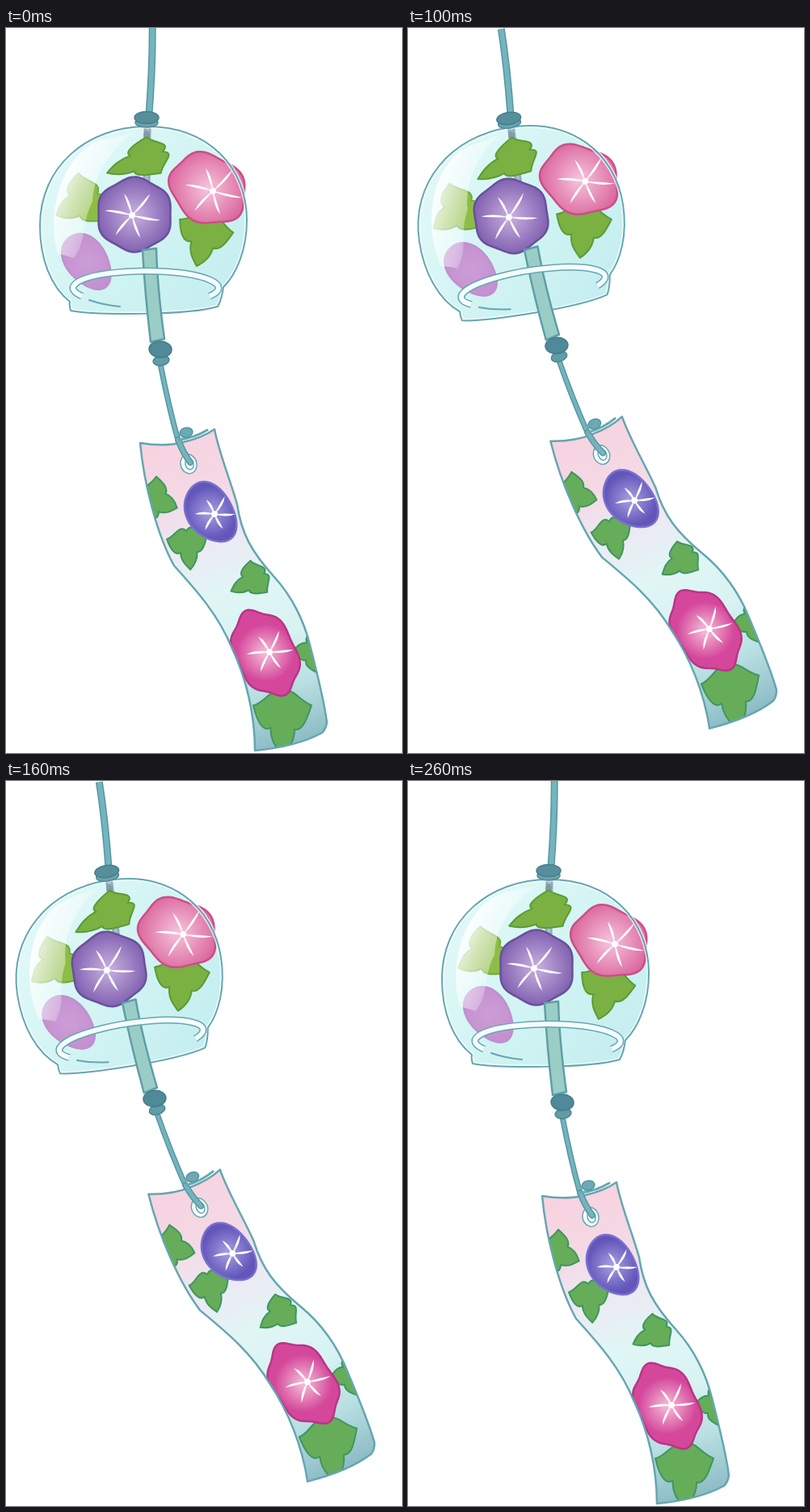
Animation, 490 px wide and 898 px high, one loop 300 ms. Source, as an HTML page with a canvas:

```html
<!DOCTYPE html>
<html lang="en">
<head>
<meta charset="utf-8">
<title>Wind chime</title>
<style>
html, body { margin: 0; width: 100%; height: 100%; overflow: hidden; background: #fff; }
canvas { display: block; width: 490px; height: 898px; }
</style>
</head>
<body>
<canvas id="stage" width="490" height="898"></canvas>
<script>
const ctx = document.getElementById('stage').getContext('2d');
const LOOP = 300, STEP = 100, TAU = Math.PI * 2;
const TEAL = '#65a6b1';

const BELL = new Path2D('M174 122 C250 122 298 172 298 238 C298 275 285 305 269 321 Q267 336 262 345 ' +
  'C225 356 110 356 80 350 Q78 343 79 339 C55 320 42 285 42 245 C42 172 100 122 174 122 Z');
const SHEEN = new Path2D('M158 130 C125 155 108 185 107 215 C92 245 101 262 84 285 L64 279 C48 220 75 150 120 138 Z');
const TUBE = new Path2D('M169 275 L186 273 Q187 320 196 385 L179 389 Q172 330 169 275 Z');
const STRIP = new Path2D('M166 514 C184 517 204 517 219 513 Q242 508 258 497 C264 528 277 558 286 590 ' +
  'C291 625 303 648 332 680 C354 704 369 735 376 764 Q394 834 397 860 Q396 868 391 873 ' +
  'Q360 890 308 895 C308 850 297 805 280 769 C263 727 236 697 208 666 C188 630 171 568 166 514 Z');

// Three-lobed leaf in unit size, tip pointing down
const LEAF = new Path2D('M0 -.6 C.3 -.95 .5 -.5 1 -.35 C.85 0 .7 .35 .42 .3 C.42 .6 .2 .85 0 1 ' +
  'C-.2 .8 -.42 .6 -.4 .25 C-.7 .4 -.9 0 -1 -.35 C-.6 -.4 -.3 -.95 0 -.6 Z');

function paint(path, fill, edge, width = 2) {
  if (fill) { ctx.fillStyle = fill; ctx.fill(path); }
  if (edge) { ctx.strokeStyle = edge; ctx.lineWidth = width; ctx.stroke(path); }
}

function inside(path, draw) {
  ctx.save();
  ctx.clip(path);
  draw();
  ctx.restore();
}

function line(d, color, width) {
  paint(new Path2D(d), null, color, width);
}

function cord(d, width) {
  line(d, '#5797a3', width);
  line(d, '#74b4bc', width - 3);
}

function oval(x, y, rx, ry, tilt, fill, edge) {
  const path = new Path2D();
  path.ellipse(x, y, rx, ry, tilt, 0, TAU);
  paint(path, fill, edge, 1.5);
}

function ramp(x0, y0, x1, y1, colors) {
  const g = ctx.createLinearGradient(x0, y0, x1, y1);
  colors.forEach((c, i) => g.addColorStop(i / (colors.length - 1), c));
  return g;
}

function leaf(x, y, w, h, angle, fill, edge) {
  const shape = new Path2D();
  shape.addPath(LEAF, new DOMMatrix().translate(x, y).rotate(angle).scale(w, h));
  paint(shape, fill, edge);
}

// Ellipse with wavy rim; the pale heart fades out to the petal colour.
function flower({ x, y, rx, ry, tilt = 0, lobes, depth, phase = 0, heart, petal, edge, spread = 1 }) {
  const path = new Path2D();
  for (let a = 0; a < TAU; a += .05) {
    const r = 1 + depth * Math.cos(lobes * a + phase);
    const u = rx * r * Math.cos(a), v = ry * r * Math.sin(a);
    path.lineTo(x + u * Math.cos(tilt) - v * Math.sin(tilt), y + u * Math.sin(tilt) + v * Math.cos(tilt));
  }
  path.closePath();
  const g = ctx.createRadialGradient(x, y, 2, x, y, rx * spread);
  g.addColorStop(0, heart);
  g.addColorStop(1, petal);
  paint(path, g, edge, 2.5);
}

// Six tapered rays of slightly uneven length
function star(x, y, r, turn) {
  ctx.fillStyle = '#fff';
  for (let i = 0; i < 6; i++) {
    ctx.save();
    ctx.translate(x, y);
    ctx.rotate(turn + i * TAU / 6);
    const len = r * (.92 + .1 * Math.cos(i * 2.4));
    ctx.beginPath();
    ctx.moveTo(0, 0);
    ctx.quadraticCurveTo(len * .6, 5, len, 0);
    ctx.quadraticCurveTo(len * .6, -1, 0, 0);
    ctx.fill();
    ctx.restore();
  }
  oval(x, y, 4, 4, 0, '#fff');
}

function drawBell() {
  const green = ['#7bb042', '#589d36'];
  paint(BELL, ramp(60, 150, 275, 330, ['#e2f9f8', '#d2f4f3', '#c5eef0']));
  inside(BELL, () => {
    line('M175 125 L174 192', '#8dabb9', 9);
    line('M175 125 L174 192', '#a9c1ca', 4);
    oval(174, 133, 4, 6, 0, '#8799aa');
    leaf(168, 163, 24, 46, 69, ...green);
    leaf(94, 215, 33, 36, 62, '#8dbd46', '#6cac40');
    leaf(245, 258, 34, 38, 14, ...green);
    flower({ x: 100, y: 289, rx: 38, ry: 25, tilt: .95, lobes: 3, depth: .04,
      heart: '#cb9dd6', petal: '#c38fd0', edge: '#bf90cd' });
    paint(SHEEN, ramp(65, 190, 133, 222, ['#fffffff0', '#ffffffa0', '#ffffff60', '#ffffff00']));
  });
  flower({ x: 250, y: 199, rx: 49, ry: 41, tilt: .6, lobes: 5, depth: .05, phase: -.9,
    heart: '#f5c1d9', petal: '#db689f', edge: '#cc4d88' });
  star(256, 202, 36, .22);
  flower({ x: 159, y: 231, rx: 46, ry: 45, lobes: 6, depth: .035, phase: Math.PI,
    heart: '#c6aede', petal: '#8262b1', edge: '#68509c' });
  star(156, 232, 35, .17);

  paint(BELL, null, '#ffffffc0', 5);
  paint(BELL, null, TEAL, 2);
}

function drawTube() {
  paint(TUBE, '#9bcdc7', '#5e9fa7', 2.5);
  const rim = new Path2D();
  rim.ellipse(173, 322, 90, 21, 0, Math.PI * .84, Math.PI * 2.16);
  ctx.lineCap = 'butt';
  paint(rim, null, TEAL, 9);
  paint(rim, null, '#f4fdfd', 6);
  ctx.lineCap = 'round';
  line('M103 337 Q120 343 141 345', TEAL, 2);
}

function drawStrip() {
  const green = ['#65ad59', '#3f965f'];
  paint(STRIP, ramp(205, 515, 315, 895,
    ['#f7d3e0', '#f4d9e5', '#eceaf3', '#e0f6f5', '#d8f3f2', '#b8dfe1', '#8ebdc7']));
  inside(STRIP, () => {
    leaf(186, 586, 29, 27, -72, ...green);
    leaf(225, 641, 25, 30, -6, ...green);
    leaf(304, 684, 22, 29, 62, ...green);
    leaf(378, 772, 27, 23, 90, ...green);
    leaf(342, 855, 36, 46, 0, ...green);
    flower({ x: 253, y: 600, rx: 40, ry: 28, tilt: 1, lobes: 3, depth: .04, phase: 1,
      heart: '#a19ce2', petal: '#6356b9', edge: '#7770d0', spread: .8 });
    star(258, 602, 25, 0);
    flower({ x: 321, y: 774, rx: 55, ry: 37, tilt: 1.13, lobes: 6, depth: .05,
      heart: '#f5b9d5', petal: '#d4479b', edge: '#b93487', spread: .65 });
    star(326, 773, 29, -.1);
  });
  paint(STRIP, null, TEAL, 2.5);
}

function drawCords() {
  oval(226, 540, 10, 12, -.25, '#f7fdfd', TEAL);
  oval(227, 540, 5, 7, -.25, '#fff', TEAL);
  cord('M191 416 Q201 468 213 511', 7);
  cord('M213 510 Q219 526 228 538', 8);
  line('M214 510 Q232 508 249 498', '#69a8b2', 3);
  oval(223, 501, 8, 6, -.2, '#6ba9b3', '#5595a1');
  cord('M181 -12 Q182 40 177 106', 9);
  oval(174, 117, 14, 6, 0, '#6ca4ae', '#518b98');
  oval(174, 111, 15, 7.5, 0, '#568e9b', '#457f8e');
  oval(192, 412, 10, 6, -.15, '#609da7', '#4b8794');
  oval(191, 398, 14, 10, .05, '#508997', '#427b8a');
}

function draw(swung) {
  ctx.resetTransform();
  ctx.fillStyle = '#fff';
  ctx.fillRect(0, 0, 490, 898);
  if (swung) {
    // The whole chime turns rigidly about its top knot.
    ctx.translate(125, 114);
    ctx.rotate(-8.5 * Math.PI / 180);
    ctx.translate(-174, -113);
  }
  const below = new Path2D();
  below.rect(-50, 0, 600, 950);
  inside(below, () => {
    drawBell();
    drawTube();
    drawStrip();
    drawCords();
  });
}

ctx.lineJoin = ctx.lineCap = 'round';
const start = performance.now();
let shown = null;

function tick(now) {
  const t = Math.max(0, now - start) % LOOP;
  const swung = Math.floor(t / STEP) === 1;
  if (swung !== shown) draw(shown = swung);
  requestAnimationFrame(tick);
}
tick(start);
</script>
</body>
</html>
```
